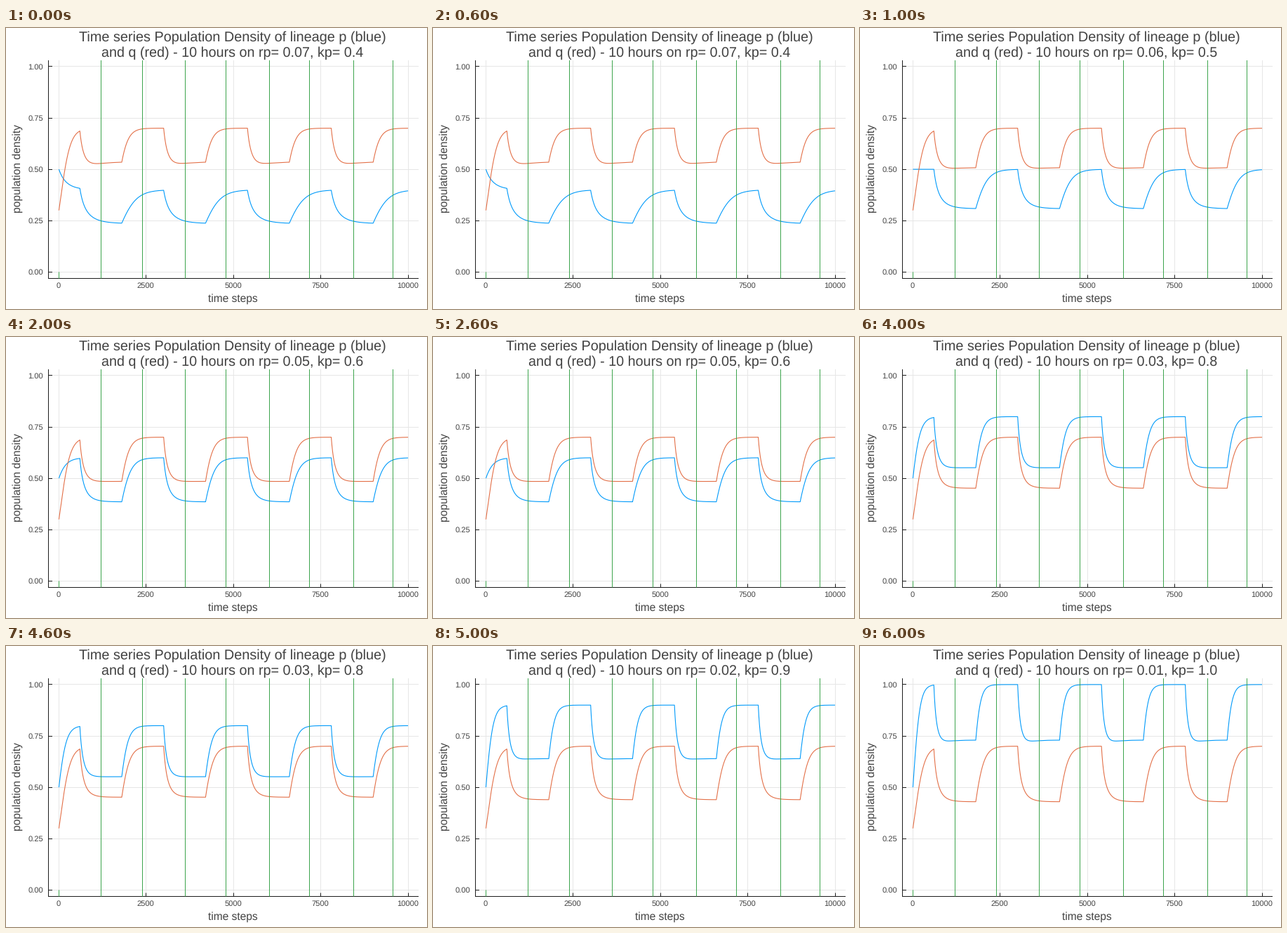
A matplotlib script that plays this animation: 600 px wide and 400 px high, repeating every 7000 ms.

```python
import numpy as np
import matplotlib.pyplot as plt
from matplotlib.animation import FuncAnimation

plt.rcParams["font.family"] = "Liberation Sans"
plt.rcParams["text.hinting"] = "none"
plt.rcParams["path.snap"] = False

W, H, DPI = 600, 400, 100
PX = 72 / DPI                      # one pixel in points
LEFT, RIGHT, TOP, BOTTOM = 60.5, 588, 46, 356.5
STEPS, RATE, K_Q = 10000, 0.01, 0.7
BLUE, RED, GREEN = "#009afa", "#e36f47", "#3da44d"
GRID, INK, TEXT = "#e6e6e6", "#1c1c1c", "#424242"


def to_x(t):
    return 75.4 + 0.04976 * t


def to_y(v):
    return 347.35 - 292.45 * v


def simulate(k_p):
    """Logistic growth of p and q; they compete in every other phase."""
    p, q = 0.5, 0.3
    path = np.empty((STEPS + 1, 2))
    for t in range(STEPS + 1):
        path[t] = p, q
        competing = (t + 600) // 1200 % 2 == 1
        loss = p * q / (p + q) if competing else 0
        p, q = (p + RATE * p * (k_p - p - loss),
                q + RATE * q * (K_Q - q - loss))
    return path.T


fig = plt.figure(figsize=(W / DPI, H / DPI), dpi=DPI, facecolor="white")
ax = fig.add_axes([0, 0, 1, 1])
ax.set_xlim(0, W)
ax.set_ylim(H, 0)
ax.axis("off")


def line(xs, ys, color, width=1):
    return ax.plot(xs, ys, color=color, lw=width * PX,
                   solid_capstyle="butt")[0]


def label(x, y, s, size, ha="center", **kw):
    return ax.text(x, y, s, size=size * PX, color=TEXT, ha=ha,
                   va="baseline", **kw)


# Grid, ticks and tick labels
for t in range(0, STEPS + 1, 2500):
    x = int(to_x(t)) + 0.5
    line([x, x], [TOP, BOTTOM], GRID)
    line([x, x], [BOTTOM - 5, BOTTOM], INK)
    label(to_x(t) - 0.5, 369.5, str(t), 11.1)
for v in np.linspace(0, 1, 5):
    y = int(to_y(v)) + 0.5
    line([LEFT, RIGHT], [y, y], GRID)
    line([LEFT, LEFT + 5.5], [y, y], INK)
    label(53, to_y(v) + 3.7, f"{v:.2f}", 11.1, ha="right")
line([LEFT, LEFT], [TOP, BOTTOM + 0.5], INK)
line([LEFT, RIGHT], [BOTTOM, BOTTOM], INK)

# Density curves
times = to_x(np.arange(STEPS + 1))
p_line = line(times, times, BLUE, 1.1)
q_line = line(times, times, RED, 1.1)

# Markers: a steep wave that crosses the plot at almost even steps
line([75.5, 75.5], [to_y(0), BOTTOM], GREEN)
for x in (135.5, 194.5, 255.5, 313.5, 375.5, 432.5, 495.5, 551.5):
    line([x, x], [TOP, BOTTOM], GREEN)

# Titles
label(322.7, 19, "Time series Population Density of lineage p (blue)", 19.85)
subtitle = label(322.7, 41, "", 19.72)
label(323.2, 389.5, "time steps", 15.5)
label(20.8, 200.5, "population density", 15.6, rotation=90,
      rotation_mode="anchor")

runs = [simulate(0.4 + 0.1 * i) for i in range(7)]


def update(i):
    p, q = runs[i]
    p_line.set_ydata(to_y(p))
    q_line.set_ydata(to_y(q))
    subtitle.set_text(f"and q (red) - 10 hours on rp= {0.07 - 0.01 * i:.2f}, "
                      f"kp= {0.4 + 0.1 * i:.1f}")
    return p_line, q_line, subtitle


anim = FuncAnimation(fig, update, frames=7, interval=1000, repeat=True,
                     repeat_delay=0)
plt.show()
```
